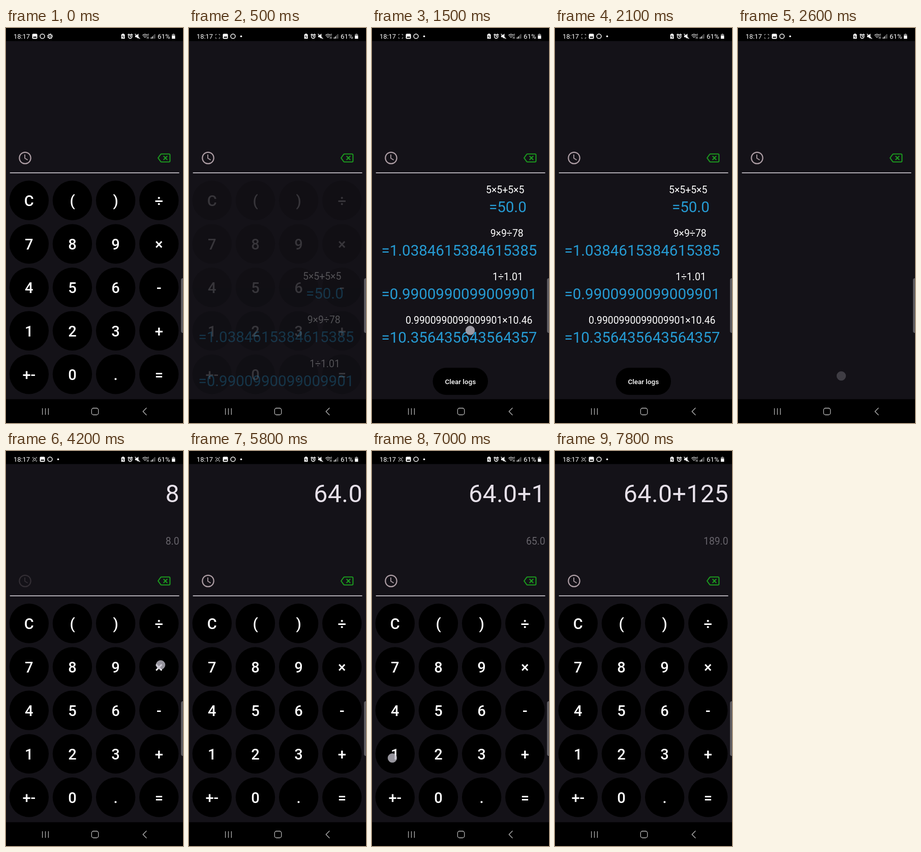
Recreate the animation shown at these times as an HTML page. Size 348 px wide and 772 px high, loop 8 s.

```html
<!DOCTYPE html>
<html lang="en">
<head>
<meta charset="utf-8">
<title>Calculator</title>
<style>
  html, body { margin: 0; width: 100%; height: 100%; overflow: hidden; background: #141218; }
  svg { display: block; width: 348px; height: 772px; font-family: Roboto, sans-serif; }
  .line { fill: none; stroke-linecap: round; stroke-linejoin: round; }
</style>
</head>
<body>
<svg id="stage" viewBox="0 0 348 772">
  <defs>
    <clipPath id="panel"><rect y="284" width="348" height="441.5"/></clipPath>
    <g id="picture">
      <rect x="-5" y="-5" width="10" height="10" rx="2" fill="#fff"/>
      <path d="M-3.6 3 L-1.4 -.2 L.2 1.6 L1.7 -.4 L3.8 3Z" fill="#000"/>
    </g>
    <circle id="ring" r="4.4" fill="none" stroke="#fff" stroke-width="1.5"/>
  </defs>

  <rect width="348" height="772" fill="#141218"/>

  <g text-anchor="end" letter-spacing=".4">
    <text id="expr" x="341" y="100" font-size="48.3" fill="#e6e0e9"></text>
    <text id="preview" x="340.5" y="183.3" font-size="19.3" letter-spacing="0" fill="#67646b"></text>
  </g>

  <g id="clock" class="line" stroke="#ad9da4" stroke-width="2.2">
    <circle cx="37.5" cy="254" r="11.2"/>
    <path d="M37 248 V254.6 L42 257.6" stroke-width="1.8"/>
  </g>
  <g class="line" stroke="#1c981f" stroke-width="2.1">
    <path d="M305.6 246.3 H320.5 Q322.4 246.3 322.4 248.2 V259.8 Q322.4 261.7 320.5 261.7 H305.6 Q304.6 261.7 304 260.8 L299 254 L304 247.2 Q304.6 246.3 305.6 246.3Z"/>
    <path d="M310.2 250.8 L316.6 257.2 M316.6 250.8 L310.2 257.2"/>
  </g>
  <rect x="7.7" y="282.3" width="332.8" height="1.5" fill="#e0dbe3"/>

  <g clip-path="url(#panel)">
    <g id="keys" fill="#fff" font-size="29" font-weight="500" text-anchor="middle"></g>
    <g id="logs"></g>
  </g>

  <rect x="344" y="489" width="12" height="107" rx="4" fill="#5d5b60"/>

  <rect width="348" height="25.5" fill="#000"/>
  <rect y="725.5" width="348" height="46.5" fill="#000"/>

  <g fill="#fff">
    <text x="15" y="20.7" font-size="12.9">18:17</text>
    <text x="298" y="20.7" font-size="13.4">61%</text>
    <g id="before">
      <use href="#picture" x="56.5" y="16.2"/>
      <use href="#ring" x="71.5" y="16.2"/>
      <g transform="translate(86.5 16.2)" fill="none" stroke="#fff">
        <circle r="3.5" stroke-width="1.5"/>
        <circle r="4.7" stroke-width="1.4" stroke-dasharray="1.85 1.84"/>
        <circle r="1" stroke-width="1"/>
      </g>
    </g>
    <g id="after">
      <path class="line" d="M52.3 14 V12.4 H54 M58.8 12.4 H60.5 V14 M60.5 18.6 V20.2 H58.8 M54 20.2 H52.3 V18.6" stroke="#bbb" stroke-width="1"/>
      <rect id="rec" x="54.4" y="14.4" width="4" height="3.8" rx="1" fill="none" stroke="#ccc" stroke-width="1.1"/>
      <use href="#picture" x="71.5" y="16.2"/>
      <use href="#ring" x="86.5" y="16.2"/>
      <circle cx="102.5" cy="16.2" r="1.8"/>
    </g>
    <path d="M228.6 11 H231.6 V12.3 H233.5 V21 H226.7 V12.3 H228.6Z"/>
    <path d="M230.1 14.3 L228.6 17 H231.6 L230.1 19.4" class="line" stroke="#000"/>
    <g class="line" stroke="#fff" stroke-width="1.4">
      <circle cx="244.2" cy="16.6" r="3.6"/>
      <path d="M244.2 14.7 V16.8 H245.7 M239.8 13.4 L241.8 11.8 M248.6 13.4 L246.6 11.8"/>
    </g>
    <path d="M254 14.4 H256.3 L260.4 11 V21 L256.3 18 H254Z"/>
    <path d="M253.8 11.8 L263 20.8" class="line" stroke="#fff" stroke-width="1.2"/>
    <g class="line" stroke="#ddd" stroke-width="1.2">
      <path d="M268.8 14 Q273.2 10.2 277.6 14 M270.4 16.2 Q273.2 13.8 276 16.2 M272 18.3 Q273.2 17.4 274.4 18.3"/>
      <path d="M277.6 20.6 V17 M280 17 V20.6" stroke-width="1"/>
    </g>
    <text x="278" y="15" font-size="6">6</text>
    <path d="M284.6 18.4h1.5v2.4h-1.5z M287 16.4h1.5v4.4h-1.5z"/>
    <path d="M289.4 14.2h1.5v6.6h-1.5z M291.8 12h1.5v8.8h-1.5z" fill="#777"/>
    <path d="M327.8 11 H330.6 V12.2 H332.4 V21 H326 V12.2 H327.8Z" fill="#888"/>
    <path d="M326 15.2 H332.4 V21 H326Z"/>
  </g>

  <g class="line" stroke="#b5b5b5" stroke-width="1.3">
    <path d="M71.6 743.6 V755.4 M77.5 743.6 V755.4 M83.4 743.6 V755.4"/>
    <rect x="168.3" y="743" width="13.4" height="13" rx="3.8"/>
    <path d="M276 742.8 L269.3 749.5 L276 756.2"/>
  </g>

  <circle id="dot" r="8.8" fill="#c0bec9" fill-opacity=".78" stroke="#d8d6df" stroke-opacity=".5" stroke-width=".8"/>
</svg>

<script>
const LOOP = 8000, STEP = 100;
const $ = id => document.getElementById(id);
const clamp = v => Math.max(0, Math.min(1, v));
const ramp = (t, a, b) => clamp((t - a) / (b - a));
const mix = (a, b, p) => a + (b - a) * p;

function add(parent, tag, attrs, text) {
  const el = document.createElementNS("http://www.w3.org/2000/svg", tag);
  for (const k in attrs) el.setAttribute(k, attrs[k]);
  if (text) el.textContent = text;
  parent.append(el);
}

["C", "(", ")", "÷", "7", "8", "9", "×", "4", "5", "6", "-",
 "1", "2", "3", "+", "+-", "0", ".", "="].forEach((label, i) => {
  const x = 45.3 + 85.15 * (i % 4), y = 337 + 84.95 * Math.floor(i / 4);
  add($("keys"), "circle", { cx: x, cy: y, r: 38.7, fill: "#000" });
  add($("keys"), "text", { x, y: y + 11.3 }, label);
});

// expression, its x, result, its x
[["5×5+5×5", 224, "=50.0", 230],
 ["9×9÷78", 232.7, "=1.0384615384615385", 18.5],
 ["1÷1.01", 237, "=0.9900990099009901", 18.5],
 ["0.9900990099009901×10.46", 66, "=10.356435643564357", 18.5]
].forEach(([sum, x, result, rx], i) => {
  const y = 322.6 + 85.2 * i;
  add($("logs"), "text", { x, y, "font-size": 19.4, fill: "#fff" }, sum);
  add($("logs"), "text", { x: rx, y: y + 37, "font-size": 29.5, fill: "#269bd3" }, result);
});
add($("logs"), "rect", { x: 119.5, y: 664, width: 108.5, height: 53, rx: 26.5, fill: "#000" });
add($("logs"), "text", { x: 173.8, y: 695.6, "font-size": 13.5, "font-weight": 500,
  "text-anchor": "middle", fill: "#fff" }, "Clear logs");

// start, release, x, y, optional start y of a drag
const taps = [
  [100, 300, 37, 254],
  [1100, 1800, 193, 591, 530],
  [2200, 2500, 203, 680],
  [3500, 3800, 133, 421],
  [4200, 4400, 304, 418],
  [5100, 5300, 134, 420],
  [5500, 5600, 303, 683],
  [6500, 6700, 301, 609],
  [6900, 7000, 40, 600],
  [7100, 7300, 133, 597],
  [7400, 7600, 133, 502]
];

// time, expression, preview
const typed = [
  [0, "", ""],
  [3700, "8", "8.0"],
  [4300, "8×", "8.0"],
  [5200, "8×8", "64.0"],
  [5600, "64.0", ""],
  [6800, "64.0+", ""],
  [7000, "64.0+1", "65.0"],
  [7200, "64.0+12", "76.0"],
  [7500, "64.0+125", "189.0"]
];

const show = (id, a) => $(id).setAttribute("opacity", a);

function drawDot(t) {
  const tap = taps.find(([a, b]) => t >= a && t <= b + 100);
  if (!tap) return show("dot", 0);
  const [a, b, x, y, from = y] = tap;
  $("dot").setAttribute("cx", x);
  $("dot").setAttribute("cy", mix(from, y, ramp(t, a, a + 400)));
  show("dot", t > b ? 0.32 : 1);
}

function draw(t) {
  const open = ramp(t, 350, 900);
  const back = ramp(t, 2600, 2800);
  show("keys", Math.max(Math.pow(1 - open, 6), back));
  show("logs", open * (1 - ramp(t, 2250, 2500)));
  $("logs").setAttribute("transform", `translate(0 ${441 * Math.pow(1 - open, 3)})`);

  const [, sum, result] = typed.filter(s => s[0] <= t).pop();
  $("expr").textContent = sum;
  $("preview").textContent = result;

  show("clock", t >= 2700 && t < 5600 ? 0.2 : 1);
  show("before", t < 200 ? 1 : 0);
  show("after", t < 200 ? 0 : 1);
  show("rec", t < 3400 ? 0 : 1);
  drawDot(t);
}

const start = performance.now();
function frame() {
  const t = (performance.now() - start) % LOOP;
  draw(Math.floor(t / STEP) * STEP);
  requestAnimationFrame(frame);
}
frame();
</script>
</body>
</html>
```
